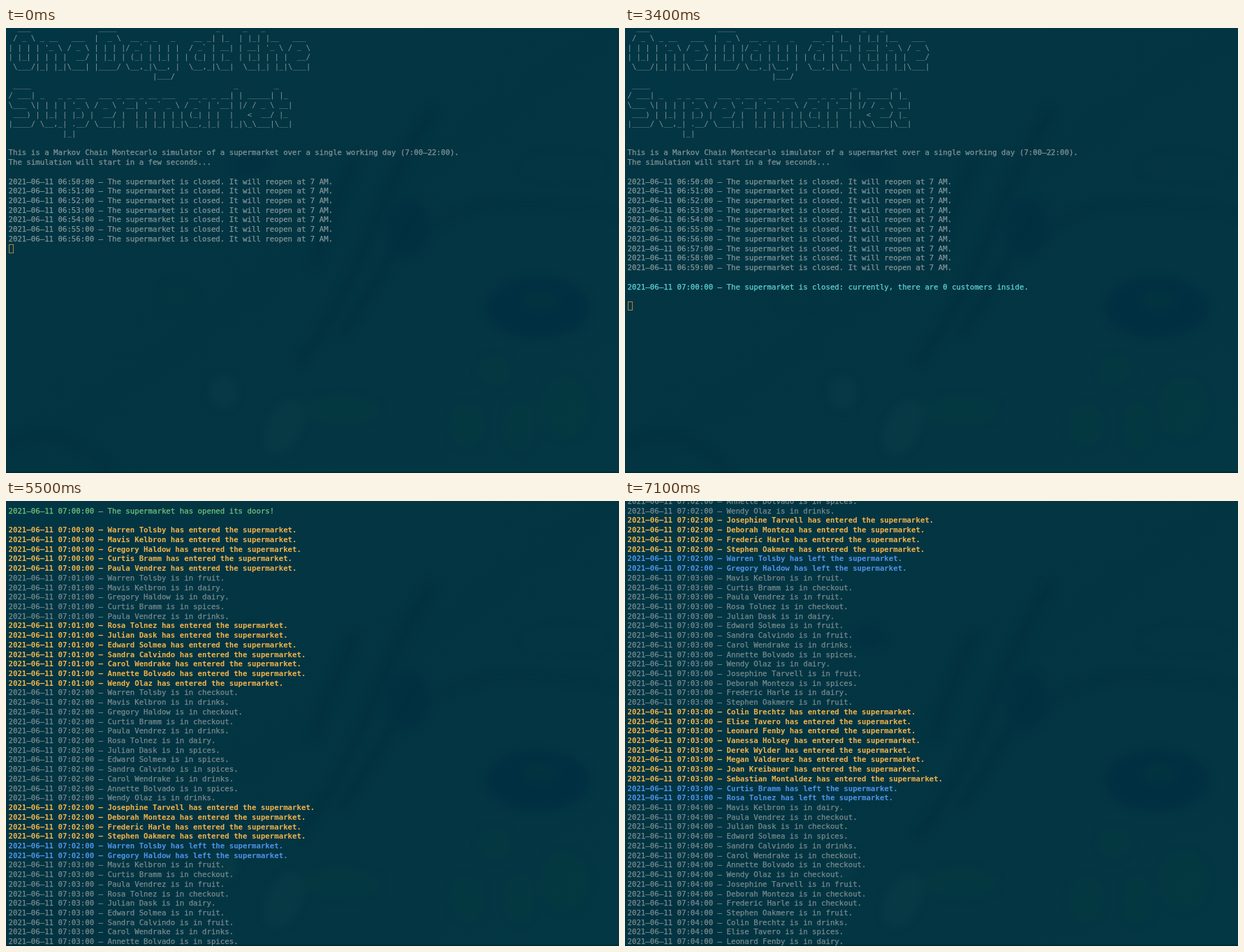
An HTML page that plays this animation: 878 px wide and 638 px high, repeating every 7.2 s.

```html
<!DOCTYPE html>
<html lang="en">
<head>
<meta charset="utf-8">
<title>Supermarket simulator</title>
<style>
  html, body { margin: 0; width: 100%; height: 100%; overflow: hidden; background: #033543; }
  #stage { position: relative; width: 878px; height: 638px; overflow: hidden; }
  #backdrop { position: absolute; inset: 0; }
  #screen {
    position: absolute; left: 3.5px; margin: 0; color: #839597;
    font: 10.72px/13.72px "DejaVu Sans Mono", "Liberation Mono", monospace;
    font-variant-ligatures: none; white-space: pre;
    -webkit-text-stroke: .25px currentColor;
  }
  #screen div { height: 13.72px; }
  #title i { font-style: normal; position: relative; top: -1.3px; }
  #screen #title { height: 164.64px; -webkit-text-stroke: 0; }
  #screen .inside { color: #7b8b8e; }
  #screen .status { color: #62d3d6; }
  #screen .open { color: #73c57c; }
  #screen .enter { color: #f3b34a; font-weight: bold; -webkit-text-stroke: 0; }
  #screen .left { color: #4f93e8; font-weight: bold; -webkit-text-stroke: 0; }
  #cursor {
    position: absolute; left: 4px; width: 6.5px; height: 13.4px;
    box-sizing: border-box; border: 1px solid #a58a43;
  }
</style>
</head>
<body>
<div id="stage">
<svg id="backdrop" width="878" height="638" aria-hidden="true">
  <defs>
    <filter id="soft" x="-30%" y="-30%" width="160%" height="160%" color-interpolation-filters="sRGB">
      <feGaussianBlur stdDeviation="6"/>
    </filter>
    <linearGradient id="base" x2="1" y2="1">
      <stop offset="0" stop-color="#033644"/>
      <stop offset=".5" stop-color="#033442"/>
      <stop offset="1" stop-color="#043744"/>
    </linearGradient>
  </defs>
  <rect width="878" height="638" fill="url(#base)"/>
  <g filter="url(#soft)">
    <g fill="none" stroke="#002d3d" stroke-opacity=".45" stroke-width="14">
      <path d="M610 120Q560 200 520 300T420 480"/>
      <path d="M500 190Q470 260 440 340"/>
      <path d="M590 260Q540 350 480 440"/>
      <path d="M570 330Q620 250 730 252T878 270" stroke-width="5"/>
      <path d="M0 600Q70 550 150 638" stroke-width="6"/>
    </g>
    <g fill="#002f41">
      <ellipse cx="762" cy="401" rx="74" ry="43" opacity=".8"/>
      <ellipse cx="575" cy="285" rx="30" ry="40" opacity=".5"/>
      <ellipse cx="350" cy="195" rx="22" ry="14" opacity=".4"/>
    </g>
    <g fill="#0a3d48" opacity=".6">
      <ellipse cx="312" cy="522" rx="20" ry="23"/>
      <ellipse cx="398" cy="572" rx="24" ry="42" transform="rotate(25 398 572)"/>
      <ellipse cx="800" cy="200" rx="60" ry="18" opacity=".4"/>
    </g>
    <g fill="#053b40" opacity=".6">
      <ellipse cx="480" cy="548" rx="55" ry="20"/>
      <ellipse cx="700" cy="490" rx="22" ry="20"/>
      <ellipse cx="660" cy="570" rx="24" ry="30"/>
      <ellipse cx="735" cy="570" rx="20" ry="34"/>
      <ellipse cx="800" cy="545" rx="34" ry="42"/>
      <ellipse cx="765" cy="390" rx="26" ry="16" opacity=".6"/>
      <ellipse cx="245" cy="385" rx="24" ry="22" opacity=".5"/>
    </g>
  </g>
  <rect y="636" width="878" height="2" fill="#01242e" opacity=".6"/>
</svg>
<pre id="screen"><div id="title">  ___               ____                      _     _   _
 / _ \ _ __   ___  |  _ \  __ _ _   _    __ _| |_  | |_| |__   ___
| | | | '_ \ / _ \ | | | |/ _` | | | |  / _` | __| | __| '_ \ / _ \
| |_| | | | |  __/ | |_| | (_| | |_| | | (_| | |_  | |_| | | |  __/
 \___/|_| |_|\___| |____/ \__,_|\__, |  \__,_|\__|  \__|_| |_|\___|
                                |___/
 ____                                             _        _
/ ___| _   _ _ __   ___ _ __ _ __ ___   __ _ _ __| | _____| |_
\___ \| | | | '_ \ / _ \ '__| '_ ` _ \ / _` | '__| |/ / _ \ __|
 ___) | |_| | |_) |  __/ |  | | | | | | (_| | |  |   &lt;  __/ |_
|____/ \__,_| .__/ \___|_|  |_| |_| |_|\__,_|_|  |_|\_\___|\__|
            |_|</div></pre>
<div id="cursor"></div>
</div>
<script>
const ROW = 13.72, TOP = -5.9, TITLE_ROWS = 12, LOOP = 7200;
const screen = document.getElementById('screen');
const title = document.getElementById('title');
const cursor = document.getElementById('cursor');
title.innerHTML = title.innerHTML.replace(/_+/g, '<i>$&</i>');

const names = ['Warren Tolsby', 'Mavis Kelbron', 'Gregory Haldow', 'Curtis Bramm', 'Paula Vendrez',
  'Rosa Tolnez', 'Julian Dask', 'Edward Solmea', 'Sandra Calvindo', 'Carol Wendrake',
  'Annette Bolvado', 'Wendy Olaz', 'Josephine Tarvell', 'Deborah Monteza', 'Frederic Harle',
  'Stephen Oakmere', 'Colin Brechtz', 'Elise Tavero', 'Leonard Fenby', 'Vanessa Holsey',
  'Derek Wylder', 'Megan Valderuez', 'Joan Kreibauer', 'Sebastian Montaldez'];
const places = { f: 'fruit', d: 'dairy', s: 'spices', k: 'drinks', c: 'checkout' };

// One entry per minute from 07:00: where customers stand, how many arrive, who leaves.
const minutes = [
  { at: '', arrive: 5, leave: [] },
  { at: 'fddsk', arrive: 7, leave: [] },
  { at: 'ckcckdsssksk', arrive: 4, leave: [0, 2] },
  { at: 'fcfcdffksdfsdf', arrive: 8, leave: [3, 5] },
  { at: 'dccskcccfccfksd', arrive: 0, leave: [] }
];

// [time, rows printed, rows scrolled away]
const steps = [
  [0, 23, 0], [500, 24, 0], [1500, 25, 0], [2500, 29, 0],
  [3500, 41, 0], [4500, 60, 8], [5500, 80, 28], [6500, 105, 58]
];

const lines = [];
function print(text = '', kind = '') {
  const line = document.createElement('div');
  line.textContent = text;
  line.className = kind;
  screen.append(line);
  lines.push(line);
}
const log = (clock, text, kind) => print(`2021–06–11 ${clock}:00 – ${text}`, kind);

function printAll() {
  print();
  print('This is a Markov Chain Montecarlo simulator of a supermarket over a single working day (7:00–22:00).');
  print('The simulation will start in a few seconds...');
  print();
  for (let m = 50; m < 60; m++) log(`06:${m}`, 'The supermarket is closed. It will reopen at 7 AM.');
  print();
  log('07:00', 'The supermarket is closed: currently, there are 0 customers inside.', 'status');
  print();
  log('07:00', 'The supermarket has opened its doors!', 'open');
  print();

  let inside = [], next = 0;
  minutes.forEach(({ at, arrive, leave }, m) => {
    const clock = `07:0${m}`;
    [...at].forEach((p, i) => log(clock, `${names[inside[i]]} is in ${places[p]}.`, 'inside'));
    for (let i = 0; i < arrive; i++) {
      log(clock, `${names[next]} has entered the supermarket.`, 'enter');
      inside.push(next++);
    }
    leave.forEach(id => log(clock, `${names[id]} has left the supermarket.`, 'left'));
    inside = inside.filter(id => !leave.includes(id));
  });
}

let current;
function draw() {
  const t = performance.now() % LOOP;
  const step = steps.findLast(s => s[0] <= t);
  if (step !== current) {
    current = step;
    const [, shown, scroll] = step;
    screen.style.top = `${TOP - scroll * ROW}px`;
    cursor.style.top = `${TOP + (shown - scroll) * ROW}px`;
    lines.forEach((line, i) => {
      line.style.visibility = i + TITLE_ROWS < shown ? 'visible' : 'hidden';
    });
  }
  requestAnimationFrame(draw);
}

printAll();
draw();
</script>
</body>
</html>
```
